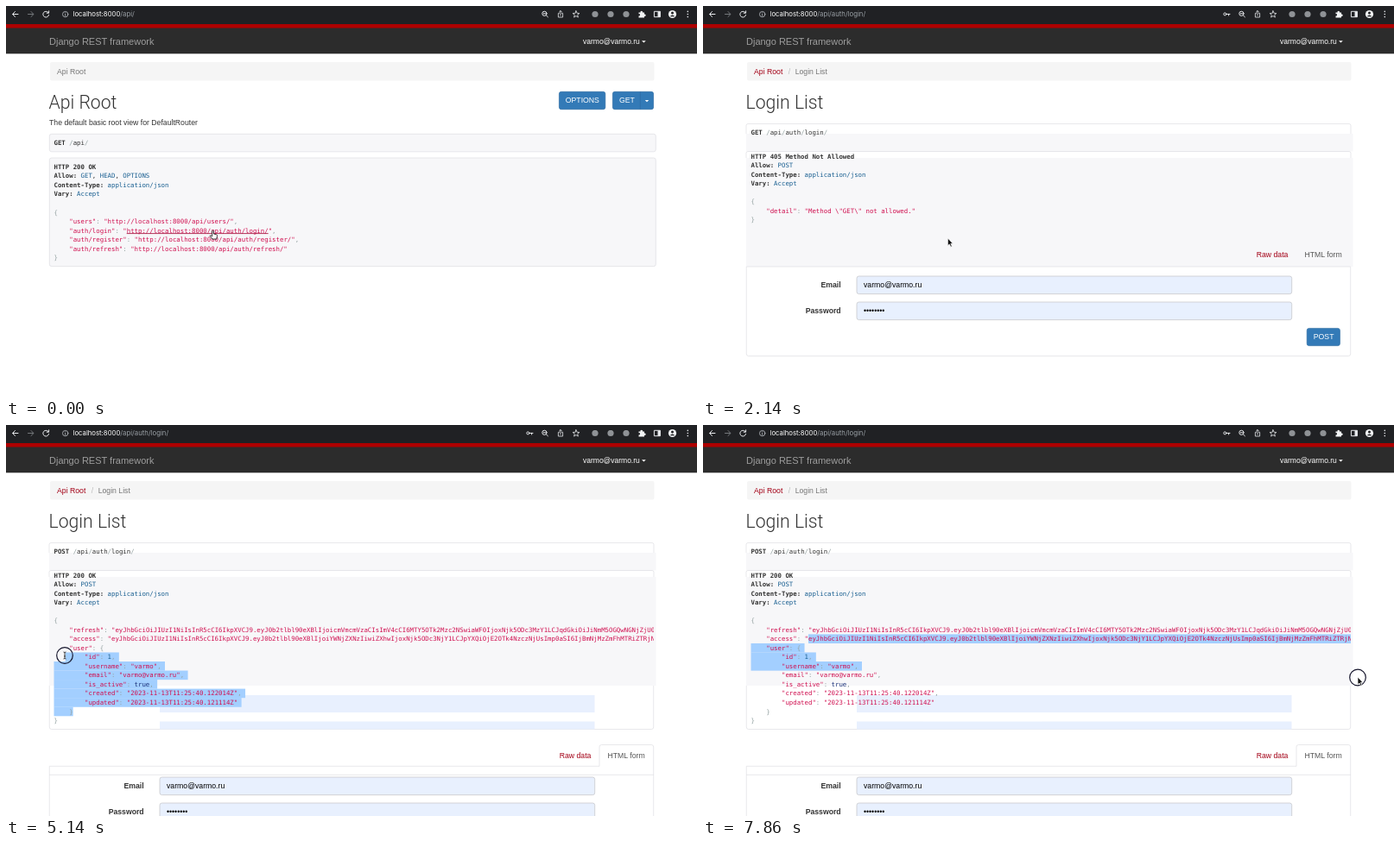
Recreate the animation shown at these times as an HTML page. Size 800x453 px, loop 8 s.

```html
<!DOCTYPE html>
<html lang="en">
<head>
<meta charset="utf-8">
<title>API login</title>
<style>
html, body { margin: 0; width: 100%; height: 100%; overflow: hidden; background: #fff; }
svg { display: block; width: 100%; height: 100%; }
text { white-space: pre; font: 8.7px "Liberation Sans", Arial, sans-serif; fill: #333; }
.url { font: 7.75px Inter, sans-serif; fill: #9aa0a6; }
.brand { font-size: 11px; fill: #9d9d9d; }
.title { font: 300 21.2px Roboto, sans-serif; }
.code { font: 7.36px "DejaVu Sans Mono", monospace; }
.bold { font-weight: bold; }
.link { fill: #a30016; }
.white { fill: #fff; }
.muted { fill: #777; }
.str { fill: #d01050; }
.pun { fill: #93a1a1; }
.lit { fill: #195f91; }
.kwd { fill: #1e347b; }
.btn { fill: #337ab7; stroke: #2e6da4; stroke-width: .7; }
.line { fill: none; stroke: #dfdfe2; stroke-width: .7; }
.icon { fill: none; stroke: #e8eaed; stroke-width: 1; stroke-linecap: round; stroke-linejoin: round; }
</style>
</head>
<body>
<svg id="stage" viewBox="0 0 800 453" preserveAspectRatio="none"></svg>
<script>
const LOOP = 8000, STEP = 1000 / 7;
const LEFT = 55.5, CHAR = 4.431, ROW = 10.53, EDGE = 750;
const USER = "varmo", MAIL = "varmo@varmo.ru";
const HOST = "localhost:8000";

const rect = (x, y, w, h, attrs) => `<rect x="${x}" y="${y}" width="${w}" height="${h}" ${attrs}/>`;
const text = (x, y, s, cls = "", attrs = "") => `<text x="${x}" y="${y}" class="${cls}" ${attrs}>${s}</text>`;
const span = (s, cls) => `<tspan class="${cls}">${s}</tspan>`;
const path = (d, attrs = 'class="icon"') => `<path d="${d}" ${attrs}/>`;
const dot = (x, y, r, attrs) => `<circle cx="${x}" cy="${y}" r="${r}" ${attrs}/>`;
const group = (id, body) => `<g id="${id}">${body}</g>`;
const caret = (x, y, r) => path(`M${x - r} ${y}h${2 * r}l${-r} ${r}z`, 'fill="#fff"');

// Signed token, cut off by the edge of the code box
const b64 = data => btoa(JSON.stringify(data)).replace(/=+$/, "");
const issued = 1699877365;
const token = (type, life, jti) => b64({ alg: "HS256", typ: "JWT" }) + "." +
  b64({ token_type: type, exp: issued + life, iat: issued, jti });

const resultLines = [
  "HTTP 200 OK", "Allow: POST", "Content-Type: application/json", "Vary: Accept", "",
  "{",
  `    "refresh": "${token("refresh", 86400, "b6c98d04ccf54a17be20")}",`,
  `    "access": "${token("access", 300, "0f633faa14be4c69d852")}",`,
  '    "user": {',
  '        "id": 1,',
  `        "username": "${USER}",`,
  `        "email": "${MAIL}",`,
  '        "is_active": true,',
  '        "created": "2023-11-13T11:25:40.122014Z",',
  '        "updated": "2023-11-13T11:25:40.121114Z"',
  "    }",
  "}"
];
const loginLines = [
  "HTTP 405 Method Not Allowed", ...resultLines.slice(1, 5),
  "{", '    "detail": "Method \\"GET\\" not allowed."', "}"
];
const api = p => `"http://${HOST}/api/${p}/"`;
const rootLines = [
  "HTTP 200 OK", "Allow: GET, HEAD, OPTIONS", ...resultLines.slice(2, 5),
  "{",
  `    "users": ${api("users")},`,
  `    "auth/login": ${api("auth/login")},`,
  `    "auth/register": ${api("auth/register")},`,
  `    "auth/refresh": ${api("auth/refresh")}`,
  "}"
];

const tokenClass = s =>
  s[0] === '"' ? "str" : /[{}:,/]/.test(s) ? "pun" : /^\d/.test(s) ? "lit" : s === "true" ? "kwd" : "";
const paint = s => s.replace(/"(?:\\.|[^"\\])*"|[{}:,]|\w+/g, m => span(m, tokenClass(m)));

function paintHeader(s) {
  const cut = s.indexOf(":") + 1;
  if (!cut) return span(s, "bold");
  const value = s.slice(cut).replace(/[^,]+/g, m => span(m, "lit"));
  return span(s.slice(0, cut), "bold") + value;
}

const codeBlock = (lines, y) => `<g clip-path="url(#codeClip)">` + lines.map((s, i) =>
  text(LEFT, y + 2.6 + i * ROW, i < 4 ? paintHeader(s) : paint(s), "code")).join("") + "</g>";

const request = (verb, url, y) =>
  text(LEFT, y, span(verb, "bold") + " " + url.replace(/\//g, m => span(m, "pun")), "code");

const panels = (rx = 0) =>
  rect(50, 148, 702.5, 20.5, `rx="${rx}" fill="#f7f7f9"`) +
  rect(50, 176, 702.5, 126, `rx="${rx}" fill="#f7f7f9"`);

const field = (id, label, value, y, filled) =>
  text(159.7, y + 3, label, "bold", 'text-anchor="end"') +
  rect(178, y - 10.3, 503.7, 20.6, `rx="2.5" fill="${filled ? "#e8f0fe" : "#fff"}" stroke="#c8c8cc" stroke-width=".8" class="${id}"`) +
  text(186, y + 3, value, id + "Text", 'style="fill:#000"');

const form = (id, y, filled) =>
  field(id, "Email", MAIL, y, filled) + field(id, "Password", "•".repeat(8), y + 30, filled);

const tabs = y => text(640.7, y, "Raw data", "link") + text(696.5, y, "HTML form", "muted", 'style="fill:#555"');

const loginHead = text(59, 79, "Api Root", "link") + text(98.8, 79, "/", "", 'style="fill:#bbb"') +
  text(106.7, 79, "Login List", "muted") + text(49.5, 119.3, "Login List", "title") +
  panels() + path("M50 148V138.5q0-2 2-2H748q2 0 2 2V148M50 176V170.5q0-2 2-2H748q2 0 2 2V176", 'class="line"');

const browserBar = rect(0, 0, 800, 21, 'fill="#202124"') +
  path("M14 9.5H8M10.5 6.5l-3 3 3 3") +
  path("M25.5 9.5h6M29 6.5l3 3-3 3", 'class="icon" style="stroke:#75787c"') +
  group("reload", path("M49 7.6A3.4 3.4 0 1 0 49.6 10.4M49.6 5.8v2.4h-2.4")) +
  group("stop", path("M43.5 6.8l5.4 5.4m0-5.4l-5.4 5.4")) +
  dot(68.7, 9.6, 3.2, 'class="icon" style="stroke:#bdc1c6;stroke-width:.8"') +
  path("M68.7 9.4v2M68.7 7.8v.1", 'class="icon" style="stroke:#bdc1c6;stroke-width:.8"') +
  '<text id="address" x="77.5" y="12.3" class="url"></text>' +
  group("key", dot(604.3, 9.4, 1.5, 'class="icon"') + path("M606 9.4h4M608.6 9.4v1.6")) +
  dot(623.4, 8.8, 2.6, 'class="icon"') + path("M625.4 10.8l2 2M622.3 8.8h2.2") +
  path("M640.4 8.4h-1v4.6h5.2V8.4h-1M642 11V5.6M640.5 7l1.5-1.5 1.5 1.5", 'class="icon" style="stroke-width:.8"') +
  path("M660 5.7l1.1 2.6 2.8.2-2.2 1.8.7 2.8-2.4-1.5-2.4 1.5.7-2.8-2.2-1.8 2.8-.2z", 'class="icon" style="stroke-width:.8"') +
  [682, 700, 718].map(x => dot(x, 9.5, 3.6, 'fill="#8f9296"')).join("") +
  path("M732.5 7.5h2a1.3 1.3 0 1 1 2.5 0h2v2a1.3 1.3 0 1 1 0 2.5v1.5h-6.5v-2a1.2 1.2 0 1 0 0-2.3z", 'fill="#f1f3f4"') +
  rect(750.8, 6.3, 6.6, 6.4, 'class="icon"') + rect(754.5, 6.3, 3, 6.4, 'fill="#e8eaed"') +
  dot(771.5, 9.5, 4.6, 'fill="#f1f3f4"') + dot(771.5, 8, 1.5, 'fill="#202124"') +
  path("M768.6 12.3q2.9-3.4 5.8 0z", 'fill="#202124"') +
  [6.4, 9.5, 12.6].map(y => dot(789.3, y, .8, 'fill="#e8eaed"')).join("");

const navbar = rect(0, 25, 800, 30.3, 'fill="#2c2c2c"') + rect(0, 21, 800, 4.5, 'fill="#ae0000"') +
  text(50, 44.5, "Django REST framework", "brand") +
  text(668, 43.6, MAIL, "white", 'style="font-size:8.5px"') + caret(738.4, 40.2, 2.4) +
  rect(51, 65, 699.5, 21.5, 'rx="2" fill="#f5f5f5"');

const rootPage = text(59, 79, "Api Root", "muted") + text(49.5, 119.3, "Api Root", "title") +
  text(50, 138, "The default basic root view for DefaultRouter") +
  rect(640.4, 99.3, 53.4, 20.4, 'rx="2.5" class="btn"') + text(647.8, 112.3, "OPTIONS", "white") +
  rect(702.4, 99.3, 47.2, 20.4, 'rx="2.5" class="btn"') + text(710, 112.3, "GET", "white") +
  path("M734.3 99.5v20", 'stroke="#2e6da4" stroke-width=".8"') + caret(742, 109, 2.2) +
  panels(2.5) + rect(50.3, 148.3, 702, 20.5, 'rx="2.5" class="line"') + rect(50.3, 176, 702, 125.6, 'rx="2.5" class="line"') +
  request("GET", "/api/", 161) + codeBlock(rootLines, 186.3) +
  path(`M${LEFT + 19 * CHAR} 263.6h${37 * CHAR}`, 'stroke="#a30030" stroke-width=".8"');

const loginPage = loginHead + request("GET", "/api/auth/login/", 149) + codeBlock(loginLines, 174) + tabs(291) +
  path("M50.3 302H749.7V403q0 2.5-2.5 2.5H52.8q-2.5 0-2.5-2.5z", 'class="line"') +
  form("entry", 323.3, false) +
  rect(697.4, 371.7, 41.6, 23.6, 'id="ring" rx="4" fill="#a9cdf3"') +
  rect(699.2, 373.4, 38.2, 20.2, 'id="post" rx="2.5" class="btn"') + text(706.8, 386.3, "POST", "white");

const resultPage = loginHead + path("M50.3 302V350q0 2.5 2.5 2.5H747.2q2.5 0 2.5-2.5V302", 'class="line"') +
  rect(178, 313, 503.5, 20, 'fill="#e8f0fe"') + rect(178, 343.5, 503.5, 9, 'fill="#e8f0fe"') +
  group("selection", "") + request("POST", "/api/auth/login/", 149) + codeBlock(resultLines, 174) + tabs(386) +
  path("M50.3 453V395.3H687V373q0-2.5 2.5-2.5H747.2q2.5 0 2.5 2.5V453M50 405.3H750", 'class="line"') +
  form("sent", 418.3, true);

const outline = 'fill="#111" stroke="#fff" stroke-width=".7" stroke-linejoin="round"';
const cursors = group("cursor",
  dot(0, 0, 9.3, 'id="press" fill="none" stroke="#15152c" stroke-width="1.2"') +
  group("arrow", path("M0-.5V8.3L2 6.5 3.4 9.7 4.9 9 3.5 5.9H6z", outline)) +
  group("hand", path("M-.8-.5Q.2-1.4.9-.4V3l3.3.8q1 .3.8 1.5L4.3 9H-.6L-3.2 5.7q-.4-1.2.9-.8l1.5 1z",
    'fill="#fff" stroke="#111" stroke-width=".8" stroke-linejoin="round"')) +
  group("ibeam", path("M-1.5-4Q0-4 0-3V3Q0 4-1.5 4M1.5-4Q0-4 0-3M0 3Q0 4 1.5 4M-.9.9H.9", 'fill="none" stroke="#111" stroke-width=".8"')));

const bubble = group("bubble", rect(0, 0, 1, 16, 'id="bubbleBox" fill="#202124"') +
  '<text id="bubbleText" x="4" y="8.8" class="url" style="font-size:6.4px;fill:#bdc1c6"></text>');

document.getElementById("stage").innerHTML =
  `<clipPath id="codeClip">${rect(50, 130, EDGE - 50, 230, "")}</clipPath>` +
  rect(0, 0, 800, 453, 'fill="#fff"') + browserBar + navbar +
  group("root", rootPage) + group("login", loginPage) + group("result", resultPage) + bubble + cursors;

const $ = id => document.getElementById(id);
const show = (id, on) => $(id).setAttribute("display", on ? "inline" : "none");
const within = (t, a, b) => t >= a && t < b;

// Rows of [time, ...values], eased between neighbours
function track(keys, t) {
  let i = keys.findIndex(k => k[0] > t);
  if (i < 0) return keys[keys.length - 1].slice(1);
  if (i === 0) return keys[0].slice(1);
  const [a, b] = [keys[i - 1], keys[i]];
  const p = (t - a[0]) / (b[0] - a[0]), e = p * p * (3 - 2 * p);
  return a.slice(1).map((v, j) => v + (b[j + 1] - v) * e);
}

const pointer = [
  [0, 239.5, 261], [860, 231, 260], [2000, 231, 260], [2720, 742, 352], [3140, 720, 380.5],
  [3420, 720, 380.5], [4000, 385.5, 332.5], [4430, 79, 332], [4570, 78, 332],
  [5140, 68, 267], [5430, 70, 260], [5860, 74, 296], [6420, 83, 262],
  [6710, 83, 262], [7000, 262, 296], [7140, 262, 296], [7570, 122, 247.5], [7720, 124, 248], [7850, 758, 292.5]
];
const bubbleTop = [
  [0, 453], [130, 453], [430, 441], [1000, 441], [1290, 450], [1420, 453],
  [3290, 453], [3570, 441], [3860, 441], [4000, 450], [4140, 453]
];

function select(r0, c0, r1, c1) {
  let out = "";
  for (let r = r0; r <= r1; r++) {
    const from = LEFT + (r === r0 ? c0 : 0) * CHAR;
    const to = Math.min(EDGE, LEFT + (r === r1 ? c1 : resultLines[r].length + 1) * CHAR);
    out += rect(from, 168.7 + r * ROW, Math.max(0, to - from), ROW + .1, 'fill="#a3cfff"');
  }
  return out;
}

function selectionAt(t, y) {
  if (t >= 7850) return select(7, 15, 10, 29);
  if (!within(t, 4570, 6990)) return "";
  const row = t >= 6420 ? 8 : Math.floor((y - 168.7) / ROW);
  return select(Math.max(8, Math.min(15, row)), 3, 15, 5);
}

function draw(now) {
  const t = Math.floor((now % LOOP + 5) / STEP) * STEP;
  const [x, y] = track(pointer, t);
  const onRoot = t < 1140, answered = t >= 3860, filled = t >= 1430;

  show("root", onRoot);
  show("login", !onRoot && !answered);
  show("result", answered);
  show("key", !onRoot);
  const loading = within(t, 3280, 3860);
  show("stop", loading);
  show("reload", !loading);
  $("address").innerHTML = span(HOST, "white") + (onRoot ? "/api/" : "/api/auth/login/");

  document.querySelectorAll(".entry").forEach(e => e.setAttribute("fill", filled ? "#e8f0fe" : "#fff"));
  document.querySelectorAll(".entryText").forEach(e => e.setAttribute("display", filled ? "inline" : "none"));
  const hover = within(t, 2990, 3860);
  show("ring", t >= 3140);
  $("post").style.fill = hover ? "#286090" : "";
  $("post").style.stroke = hover ? "#204d74" : "";

  $("selection").innerHTML = selectionAt(t, y);

  const [top] = track(bubbleTop, t);
  show("bubble", top < 452.9);
  $("bubble").setAttribute("transform", `translate(0 ${top})`);
  $("bubbleBox").setAttribute("width", t < 2000 ? 100 : 186);
  $("bubbleText").textContent = t < 2000 ? HOST + "/api/auth/login/" : "Waiting for localhost...";

  const kind = t < 1140 || within(t, 2990, 3430) ? "hand" : within(t, 4280, 7850) ? "ibeam" : "arrow";
  ["hand", "ibeam", "arrow"].forEach(id => show(id, id === kind));
  show("press", within(t, 4570, 6710) || within(t, 6990, 7140) || t >= 7570);
  $("cursor").setAttribute("transform", `translate(${x} ${y})`);
}

function tick(now) {
  draw(now);
  requestAnimationFrame(tick);
}
draw(0);
requestAnimationFrame(tick);
</script>
</body>
</html>
```
